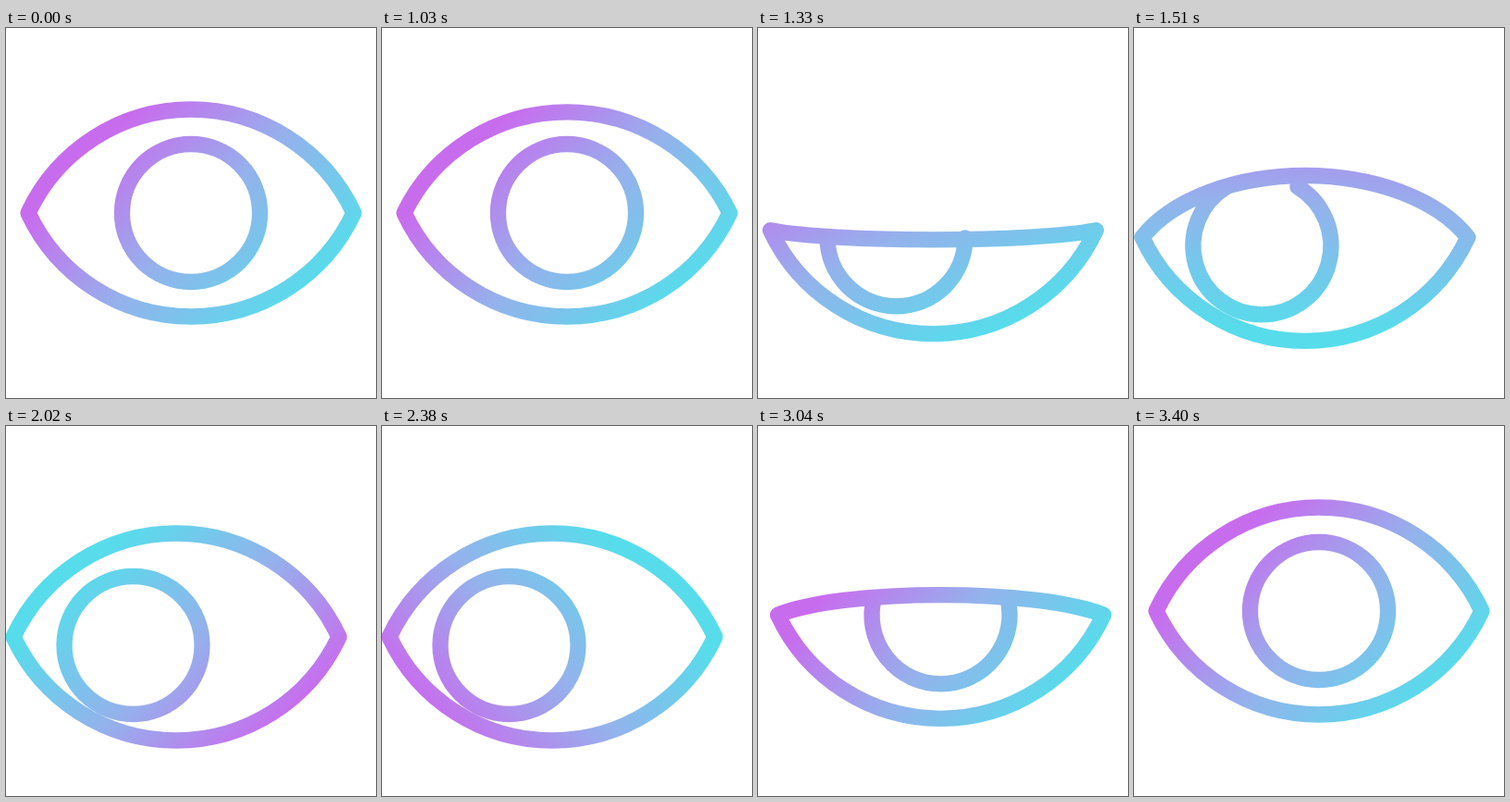
Recreate the animation shown at these times as an HTML page. Size 400 by 400 pixels, loop 3430 ms.

```html
<!DOCTYPE html>
<html lang="en">
<head>
<meta charset="utf-8">
<title>Blinking eye</title>
<style>
  html, body { margin: 0; width: 100%; height: 100%; overflow: hidden; background: #fff; }
  svg { display: block; width: 100%; height: 100%; }
  path { fill: none; stroke: url(#ink); stroke-width: 17.3; stroke-linecap: round; stroke-linejoin: round; }
</style>
</head>
<body>
<svg viewBox="0 0 400 400">
  <defs>
    <linearGradient id="ink" gradientUnits="userSpaceOnUse">
      <stop offset="0" stop-color="#c86cee"/>
      <stop offset=".5" stop-color="#94b2ec"/>
      <stop offset="1" stop-color="#57dceb"/>
    </linearGradient>
  </defs>
  <g id="eye">
    <path id="outline"/>
    <path id="iris"/>
  </g>
</svg>
<script>
const LOOP = 3430, AWAY = 1025, BACK = 2645;
const HALF = 176, SAG = 112, SHUT = -12, IRIS = 74.5, REACH = 135;
const $ = id => document.getElementById(id);
const eye = $('eye'), outline = $('outline'), iris = $('iris'), ink = $('ink');

const clamp = (v, lo, hi) => Math.max(lo, Math.min(hi, v));

// S-curve from 0 to 1 between two times; mid is where it reaches one half.
function ease(t, from, to, mid = .5, power = 2) {
  const x = clamp((t - from) / (to - from), 0, 1);
  const u = x ** (Math.log(.5) / Math.log(mid));
  const a = u ** power, b = (1 - u) ** power;
  return a / (a + b);
}

const drift = t => ease(t, 0, 750, .33, 2.4);
const slide = t => ease(t, 125, 380);
const lid = t => SAG - (SAG - SHUT) * (ease(t, 0, 180, .31) - ease(t, 290, 750, .35));

// Lid curve between the corners; its handles flatten along with its height.
function lidPath(h) {
  const top = -h, low = -.61 * h;
  return `C-144 ${low} -75.4 ${top} 0 ${top}S144 ${low} ${HALF} 0`;
}

function ringPath(x, y, cut) {
  const dx = IRIS * Math.sqrt(1 - cut * cut), top = y - IRIS * cut;
  const arc = `A${IRIS} ${IRIS} 0 0 1 `;
  return `M${x + dx} ${top}${arc}${x} ${y + IRIS}${arc}${x - dx} ${top}`;
}

function draw(t) {
  const look = drift(t - AWAY) - drift(t - BACK);
  const side = slide(t - AWAY) - slide(t - BACK);
  const open = lid(t - (t < BACK ? AWAY : BACK));

  eye.setAttribute('transform', `translate(${200 - 16 * look} ${200 + 28 * look})`);
  outline.setAttribute('d', `M${-HALF} 0${lidPath(open)}A194.3 194.3 0 0 1 ${-HALF} 0Z`);

  // The ring opens where the lid cuts it.
  const x = -46.5 * side, y = 9 * side;
  iris.setAttribute('d', ringPath(x, y, clamp((.82 * open + y) / IRIS, -1, 1)));

  // The gradient makes one clockwise turn and sways with it.
  const turn = 2 * Math.PI * ease(t, 1030, 3400, .418);
  const angle = turn - Math.PI * .75;
  const cx = 10 - 25 * Math.sin(turn), cy = 10 - 60 * Math.sin(turn);
  const dx = REACH * Math.cos(angle), dy = REACH * Math.sin(angle);
  ink.setAttribute('x1', cx + dx);
  ink.setAttribute('y1', cy + dy);
  ink.setAttribute('x2', cx - dx);
  ink.setAttribute('y2', cy - dy);
}

const start = performance.now();
function tick() {
  draw((performance.now() - start) % LOOP);
  requestAnimationFrame(tick);
}
tick();
</script>
</body>
</html>
```
